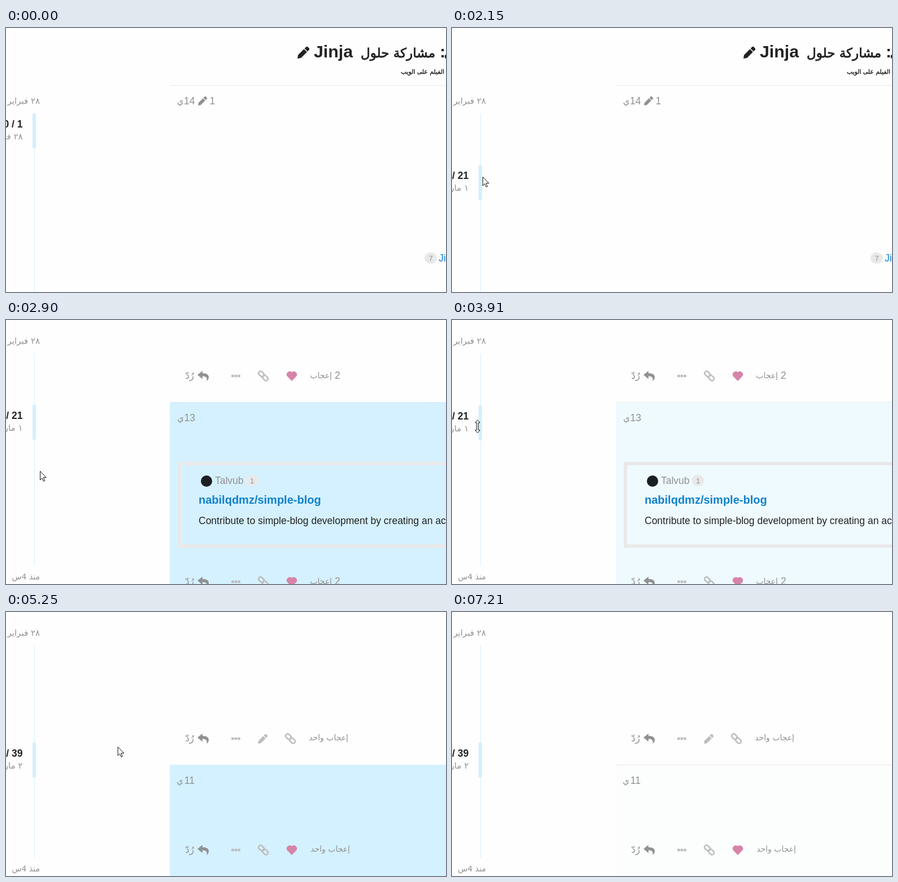
Animation, 779 px wide and 467 px high, one loop 7910 ms. Source, as an HTML page:

```html
<!DOCTYPE html>
<html lang="ar">
<head>
<meta charset="utf-8">
<style>
  html, body { margin: 0; width: 100%; height: 100%; overflow: hidden; background: #fefefe; }
  svg { display: block; width: 779px; height: 467px; }
  text { font-family: "Liberation Sans", Arial, sans-serif; fill: #919191; white-space: pre; }
  .ar { font-family: "DejaVu Sans", sans-serif; direction: rtl; }
  .b { font-weight: bold; }
  .dark { fill: #222; }
  .heavy { fill: #222; stroke: #222; stroke-width: .035em; }
  .link { fill: #0f82cc; }
  .mid { text-anchor: middle; }
  .end { text-anchor: end; }
</style>
</head>
<body>
<svg id="stage" viewBox="0 0 779 467"></svg>
<script>
const LOOP = 7910, TICK = 70;
const GRAY = '#919191', PALE = '#bdbdbd', LINE = '#e9e9e9', BLUE = '#d1f0ff';

// Drawing helpers
const text = (x, y, str, cls = '', size = 17.5) =>
  `<text x="${x}" y="${y}" class="${cls}" style="font-size:${size}px">${str}</text>`;
const arabic = (right, y, str, size, cls = '') => text(right, y, str, 'ar ' + cls, size);
const rect = (x, y, w, h, fill, extra = '') =>
  `<rect x="${x}" y="${y}" width="${w}" height="${h}" fill="${fill}" ${extra}/>`;
const rule = (y, extra) => rect(290, y, 489, 1, LINE, extra);
const badge = (x, y, n) => rect(x, y, 22, 20, LINE, 'rx="10"') + text(x + 11, y + 14.5, n, 'mid', 13);

// Icons on a 20-unit square
const icon = (x, y, size, fill, d) =>
  `<path transform="translate(${x} ${y}) scale(${size / 20})" fill="${fill}" d="${d}"/>`;
const pencil = (x, y, size, fill) =>
  icon(x, y, size, fill, 'M0 20L1 14L11 4L16 9L6 19ZM12 3L15 0H17L20 3V5L17 8Z');
const heart = (x, y) =>
  icon(x, y, 20, '#d684a8', 'M10 19L1.6 10.3A5.6 5.6 0 0 1 10 3.2A5.6 5.6 0 0 1 18.4 10.3Z');
const reply = (x, y) =>
  icon(x, y, 20, GRAY, 'M0 8L8.8 1V5.3C15 5.4 20 6.6 20 12.6Q20 16.5 16 19C18 12.5 14.5 10.7 8.8 10.6V15.4Z');
const ring = x => rect(x, -3.5, 10.8, 7, 'none', 'rx="3"');
const chain = (cx, cy) =>
  `<g transform="translate(${cx} ${cy}) rotate(45)" stroke="${PALE}" stroke-width="2.5">${ring(-10.3)}${ring(-.5)}</g>`;
const dots = (x, y) => [0, 1, 2].map(i => rect(x + i * 5.6, y - 2.3, 4.6, 4.6, PALE, 'rx="1"')).join('');

// A post's row of actions, centred on y
const actions = (y, liked, likes) =>
  arabic(333, y + 5, 'رُدّ', 17) + reply(339, y - 10) + dots(399, y) +
  (liked ? chain(455.5, y) + heart(496, y - 10) : pencil(446, y - 8, 17, PALE) + chain(503.5, y)) + likes;
const twoLikes = y => text(582, y + 5, '2') + arabic(577, y + 4, 'إعجاب', 14);
const oneLike = (right, y) => arabic(right, y + 3, 'إعجاب واحد', 14);
const age = (right, y, days) => text(right, y, days, 'end') + arabic(right - 20, y - 1, 'ي', 15);
const postTop = (id, y) => rect(290, y, 489, 467 - y, BLUE, `id="glow${id}"`) + rule(y, `id="edge${id}"`);

const scenes = [
  // Topic head
  text(775, 52, 'ي', 'dark', 26) + text(768, 52, ':', 'b dark', 30) +
  arabic(760, 52, 'مشاركة حلول', 23, 'heavy') + text(545, 52, 'Jinja', 'b dark', 30.3) +
  pencil(516, 33, 21, '#222') + arabic(776, 81, 'الفيلم على الويب', 10.8, 'heavy') +
  rule(101) + text(360.5, 135, '1') + pencil(340, 121, 16, GRAY) + age(334.5, 135, '14') +
  badge(741, 397, 7) + text(766, 413, 'Jinja', 'link'),
  // Post with a link preview
  actions(99, true, twoLikes(99)) + postTop(1, 145) + age(335, 179, '13') +
  rect(307, 254, 600, 146, 'none', `stroke="${LINE}" stroke-width="6"`) +
  '<circle cx="355" cy="285" r="10" fill="#1b1f23"/>' +
  text(370, 290, 'Talvub') + badge(424.5, 274, 1) +
  text(341, 325, 'nabilqdmz/simple-blog', 'b link', 20) +
  text(341, 361, 'Contribute to simple-blog development by creating an account', 'dark') +
  actions(463, true, twoLikes(463)),
  // Later posts
  actions(224, false, oneLike(606, 224)) + postTop(2, 270) + age(334, 304, '11') +
  actions(421, true, oneLike(609, 421))
];

document.getElementById('stage').innerHTML = scenes.map((s, i) => `<g id="scene${i}">${s}</g>`).join('') + `
  <g id="timeline">
    ${arabic(60, 134, '٢٨ فبراير', 15)}
    ${rect(50, 151, 1, 376, BLUE)}
    ${arabic(60, 551, 'منذ 4س', 14)}
    <g id="handle">
      ${rect(47, 151, 6, 62, BLUE, 'rx="2"')}
      <text id="count" x="29.5" y="176" class="b dark end" font-size="17.5"></text>
      <text id="date" x="29.5" y="197" class="ar" font-size="15"></text>
    </g>
  </g>
  <g id="cursor" fill="#fff" stroke="#111">
    <path id="arrow" d="M.5.5V16L4 12.6L6.4 18.3L8.7 17.3L6.3 11.6H11.2Z"/>
    <path id="resize" d="M0-11.5L4.3-6.5H1.5V6.5H4.3L0 11.5L-4.3 6.5H-1.5V-6.5H-4.3Z"/>
  </g>`;

const el = id => document.getElementById(id);
const show = (id, on) => el(id).style.display = on ? '' : 'none';
const move = (id, x, y) => el(id).setAttribute('transform', `translate(${x} ${y})`);
const ramp = (t, from, to) => Math.min(1, Math.max(0, (t - from) / (to - from)));

// Pointer moves: from time, to time, end point; it rests in between
const moves = [
  [60, 290, 316, 290], [380, 590, 2, 174], [690, 1110, 43, 178], [1300, 1980, 54, 263],
  [2360, 2870, 60, 267], [2940, 3150, 359, 299], [3180, 3700, 45, 187], [3840, 4480, 59, 268],
  [4790, 5530, 282, 220], [5670, 6770, 751, 468]
];
const jumps = [2660, 5085];

function pointer(t) {
  let x = 560, y = 410;
  for (const [from, to, endX, endY] of moves) {
    const p = ramp(t, from, to);
    x += (endX - x) * p;
    y += (endY - y) * p;
  }
  return [x, y];
}

// A post lights up just after the jump to it, then fades
function glow(id, t) {
  const done = 1 - (1 - ramp(t, 0, 2500)) ** 1.75;
  el('glow' + id).setAttribute('opacity', 1 - done);
  el('edge' + id).setAttribute('opacity', Math.min(1, done * 3));
}

function render(time) {
  const t = Math.floor(time / TICK) * TICK;
  const scene = jumps.filter(j => t >= j).length;
  scenes.forEach((_, i) => show('scene' + i, i === scene));
  jumps.forEach((j, i) => glow(i + 1, t - j - 70));

  const offset = 91 * ramp(t, 1180, 1835) + 83 * ramp(t, 3840, 4480) - (scene === 2 ? 2 : 0);
  const post = 1 + Math.floor(offset * 0.222);
  move('timeline', 0, scene ? -92 : 0);
  move('handle', 0, Math.round(offset));
  el('count').textContent = '70 / ' + post;
  el('date').textContent = post < 14 ? '٢٨ فبراير' : post < 30 ? '١ مارس' : '٢ مارس';

  const dragging = (t > 1000 && t < 1900) || (t > 3640 && t < 4420);
  move('cursor', ...pointer(t));
  show('cursor', t >= 60 && t < 6770);
  show('arrow', !dragging);
  show('resize', dragging);
}

const start = performance.now();
function tick() {
  render((performance.now() - start) % LOOP);
  requestAnimationFrame(tick);
}
tick();
</script>
</body>
</html>
```
